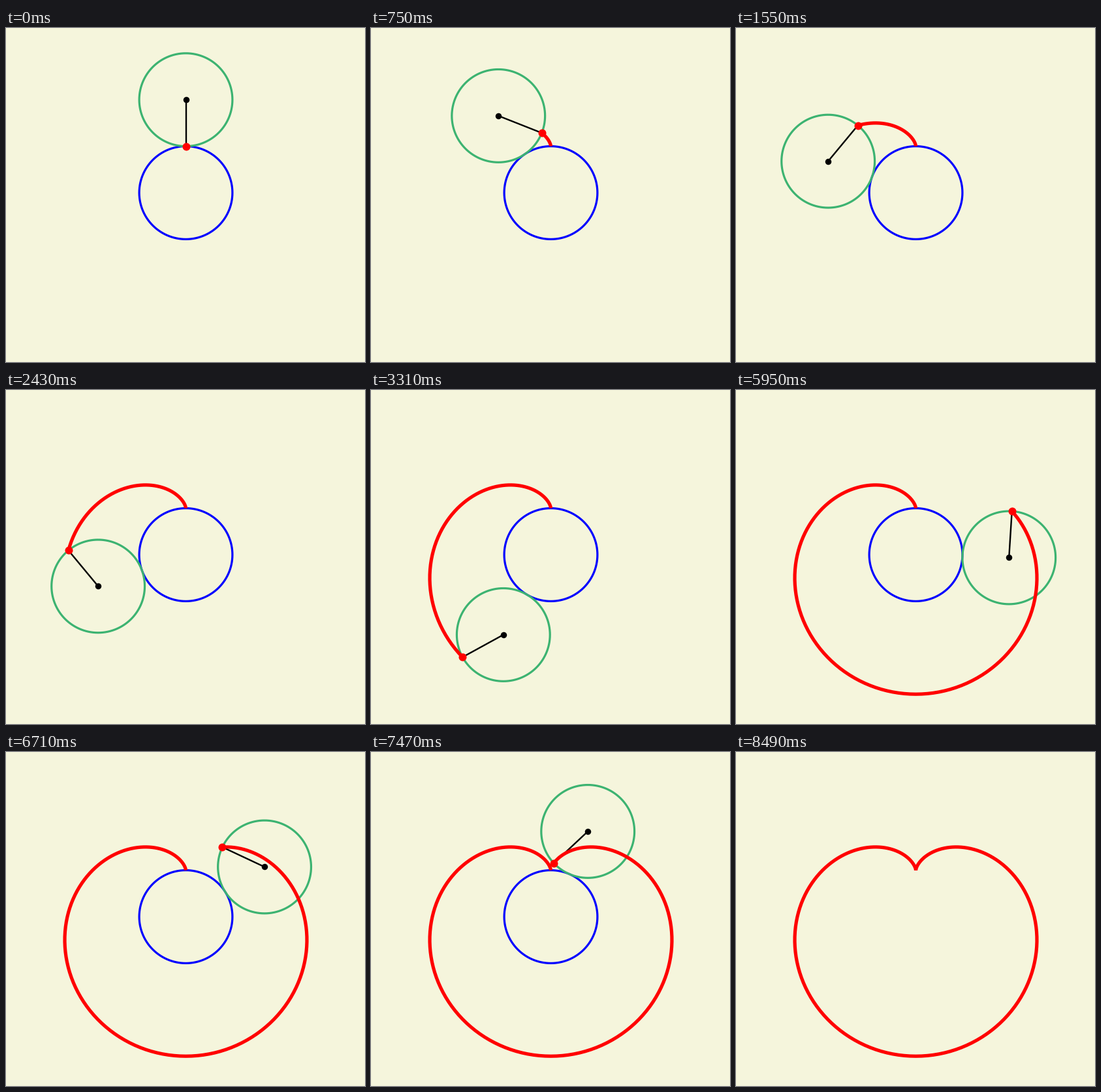
A matplotlib script that plays this animation: 550 by 513 pixels, repeating every 9490 ms.

```python
import numpy as np
import matplotlib.pyplot as plt
from matplotlib.animation import FuncAnimation

WIDTH, HEIGHT, DPI = 550, 513, 72   # at 72 dpi one point is one pixel
TICK = 13                           # ms
LOOP = 9490
FIRST, STEP, STEPS = 30, 40, 200    # ms, ms, rolling steps per turn
CURVE_ONLY = 8490                   # ms, when the circles vanish

CENTER = np.array([275.5, 253.0])
R = 71.4


def polar(angle, radius):
    """Offset measured counter-clockwise from straight up, y pointing down."""
    return -radius * np.sin(angle), -radius * np.cos(angle)


def rolling_center(t):
    dx, dy = polar(t, 2 * R)
    return CENTER[0] + dx, CENTER[1] + dy


def pen(t):
    x, y = rolling_center(t)
    dx, dy = polar(2 * t, R)
    return x - dx, y - dy


fig = plt.figure(figsize=(WIDTH / DPI, HEIGHT / DPI), dpi=DPI, facecolor="beige")
ax = fig.add_axes([0, 0, 1, 1])
ax.set_xlim(0, WIDTH)
ax.set_ylim(HEIGHT, 0)
ax.axis("off")


def line(color, width, z):
    return ax.plot([], [], color=color, lw=width, zorder=z,
                   solid_capstyle="butt", solid_joinstyle="round")[0]


def dot(color, size, z):
    return ax.plot([], [], "o", color=color, ms=size, mew=0, zorder=z)[0]


fixed = line("blue", 3.2, 1)
roller = line("mediumseagreen", 3.2, 2)
rod = line("black", 2.4, 3)
trace = line("red", 5.2, 4)
hub = dot("black", 9.5, 5)
tip = dot("red", 12, 6)
machinery = [fixed, roller, rod, hub, tip]

ring = polar(np.linspace(0, 2 * np.pi, 361), R)
angles = np.linspace(0, 2 * np.pi, STEPS + 1)
fixed.set_data(CENTER[0] + ring[0], CENTER[1] + ring[1])


def draw(i):
    ms = (i + 1) * TICK - 1   # include a step that begins within this tick
    k = min(max((ms - FIRST) // STEP + 1, 0), STEPS)
    cx, cy = rolling_center(angles[k])
    px, py = pen(angles[k])
    roller.set_data(cx + ring[0], cy + ring[1])
    rod.set_data([cx, px], [cy, py])
    hub.set_data([cx], [cy])
    tip.set_data([px], [py])
    trace.set_data(*pen(angles[:k + 1]))
    for part in machinery:
        part.set_visible(ms < CURVE_ONLY)
    return machinery + [trace]


anim = FuncAnimation(fig, draw, frames=LOOP // TICK, interval=TICK,
                     repeat=True, repeat_delay=0)
plt.show()
```
